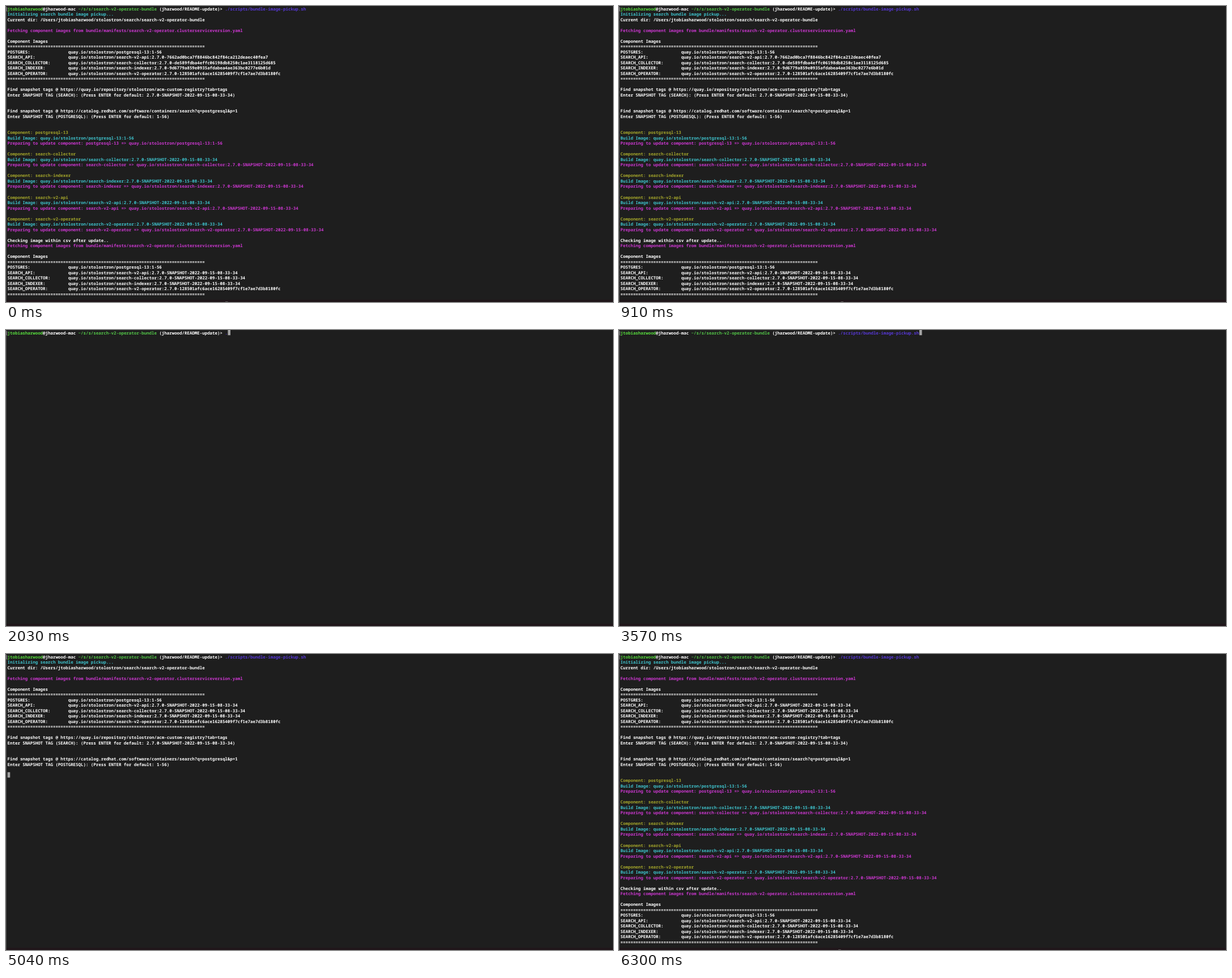
An HTML page that plays this animation: 1071x523 px, repeating every 6510 ms.

```html
<!DOCTYPE html>
<html lang="en">
<head>
<meta charset="utf-8">
<title>Bundle image pickup</title>
<style>
  html, body { margin: 0; width: 100%; height: 100%; overflow: hidden; background: #1e1e1e; }
  svg { display: block; }
  text {
    font: 600 7.448px "Noto Sans Mono", "DejaVu Sans Mono", monospace;
    font-variant-ligatures: none;
    white-space: pre;
    text-rendering: geometricPrecision;
  }
</style>
</head>
<body>
<svg id="stage" width="1071" height="523" viewBox="0 0 1071 523">
  <rect width="1071" height="523" fill="#1e1e1e"/>
  <rect y="519" width="1071" height="4" fill="#20161a"/>
  <rect width="1" height="523" fill="#494949"/>
  <rect id="mark" x="1" y="2" width="1" height="7.5" fill="#8c8c8c"/>
  <g id="rows"></g>
  <rect id="cursor" width="4.6" height="9.5" fill="#a3a3a3"/>
</svg>
<script>
const LOOP = 6510, LEFT = 2.6, CHAR = 4.469, ROW = 9.506, BASE = 7.8;
const WHITE = '#fff', CYAN = '#3fc3cd', PINK = '#cb37cf', YELLOW = '#a4a62b',
      GREEN = '#58df3e', PATH = '#53c648', BLUE = '#5738d6';

const user = 'jtobiasharwood', nick = 'jharwood';
const repo = 'quay.io/stolostron/', snapshot = '2.7.0-SNAPSHOT-2022-09-15-08-33-34';
const command = './scripts/bundle-image-pickup.sh';
const hashes = {
  api: '2.7.0-7662ad0bca7f8846bc842f84ca212deaec40fea7',
  collector: '2.7.0-de589fdba4effc06198db8250c1ae3118125d685',
  indexer: '2.7.0-9d6779a859e0935afdabea4ae363bc0277e6b01d',
  operator: '2.7.0-128501afc6ace16285409f7cf1e7ae7d3b8180fc'
};

const white = s => [[s, WHITE]];
const blank = white('');
const rule = white('='.repeat(78));
const fetching = [['Fetching component images from bundle/manifests/search-v2-operator.clusterserviceversion.yaml', PINK]];
const entry = (label, image) => white((label + ':').padEnd(24) + repo + image);

const table = tags => [
  white('Component Images'), rule,
  entry('POSTGRES', 'postgresql-13:1-56'),
  entry('SEARCH_API', 'search-v2-api:' + tags.api),
  entry('SEARCH_COLLECTOR', 'search-collector:' + tags.collector),
  entry('SEARCH_INDEXER', 'search-indexer:' + tags.indexer),
  entry('SEARCH_OPERATOR', 'search-v2-operator:' + hashes.operator),
  rule
];

const component = (name, tag = snapshot) => {
  const image = `${repo}${name}:${tag}`;
  return [
    [['Component: ' + name, YELLOW]],
    [['Build Image: ' + image, CYAN]],
    [[`Preparing to update component: ${name} => ${image}`, PINK]],
    blank
  ];
};

const updated = { api: snapshot, collector: snapshot, indexer: snapshot };

const screen = (tags, typed) => [
  [[user, GREEN], [`@${nick}-mac `, WHITE], ['~/s/s/search-v2-operator-bundle ', PATH],
   [`(${nick}/README-update)> `, WHITE], [command.slice(0, typed), BLUE]],
  [['Initializing search bundle image pickup...', CYAN]],
  white(`Current dir: /Users/${user}/stolostron/search/search-v2-operator-bundle`),
  blank, fetching, blank,
  ...table(tags), blank,
  white('Find snapshot tags @ https://quay.io/repository/stolostron/acm-custom-registry?tab=tags'),
  white(`Enter SNAPSHOT TAG (SEARCH): (Press ENTER for default: ${snapshot})`),
  blank, blank,
  white('Find snapshot tags @ https://catalog.redhat.com/software/containers/search?q=postgresql&p=1'),
  white('Enter SNAPSHOT TAG (POSTGRESQL): (Press ENTER for default: 1-56)'),
  blank, blank,
  ...component('postgresql-13', '1-56'),
  ...['search-collector', 'search-indexer', 'search-v2-api', 'search-v2-operator'].flatMap(n => component(n)),
  white('Checking image within csv after update..'),
  fetching, blank,
  ...table(updated)
];

// start time, visible rows, cursor row, cursor column, typed characters
const steps = [
  [0, 54, 55, 86, 32],
  [910, 54, 55, 87, 32],
  [1260, 0, 0, 0, 0],
  [1330, 1, 0, 86, 0],
  [2030, 1, 0, 87, 1],
  [2660, 1, 0, 118, 32],
  [3640, 5, 5, 0, 32],
  [3710, 14, 14, 0, 32],
  [3780, 17, 18, 0, 32],
  [5040, 21, 22, 0, 32],
  [6160, 30, 31, 0, 32],
  [6230, 42, 43, 0, 32],
  [6300, 54, 55, 86, 32]
];

const $ = id => document.getElementById(id);
const make = (name, attrs, parent) => {
  const node = document.createElementNS('http://www.w3.org/2000/svg', name);
  for (const key in attrs) node.setAttribute(key, attrs[key]);
  parent.append(node);
  return node;
};

function show([start, count, row, col, typed]) {
  $('rows').replaceChildren();
  screen(start < 1260 ? hashes : updated, typed).slice(0, count).forEach((line, i) => {
    const text = make('text', { x: LEFT, y: BASE + i * ROW }, $('rows'));
    for (const [words, fill] of line) make('tspan', { fill }, text).textContent = words;
  });
  $('mark').setAttribute('visibility', count ? 'visible' : 'hidden');
  $('cursor').setAttribute('x', LEFT + col * CHAR);
  $('cursor').setAttribute('y', row * ROW - 0.3);
}

let current;
function tick() {
  const t = performance.now() % LOOP;
  const step = steps.findLast(s => s[0] <= t);
  if (step !== current) show(current = step);
  requestAnimationFrame(tick);
}
tick();
</script>
</body>
</html>
```
